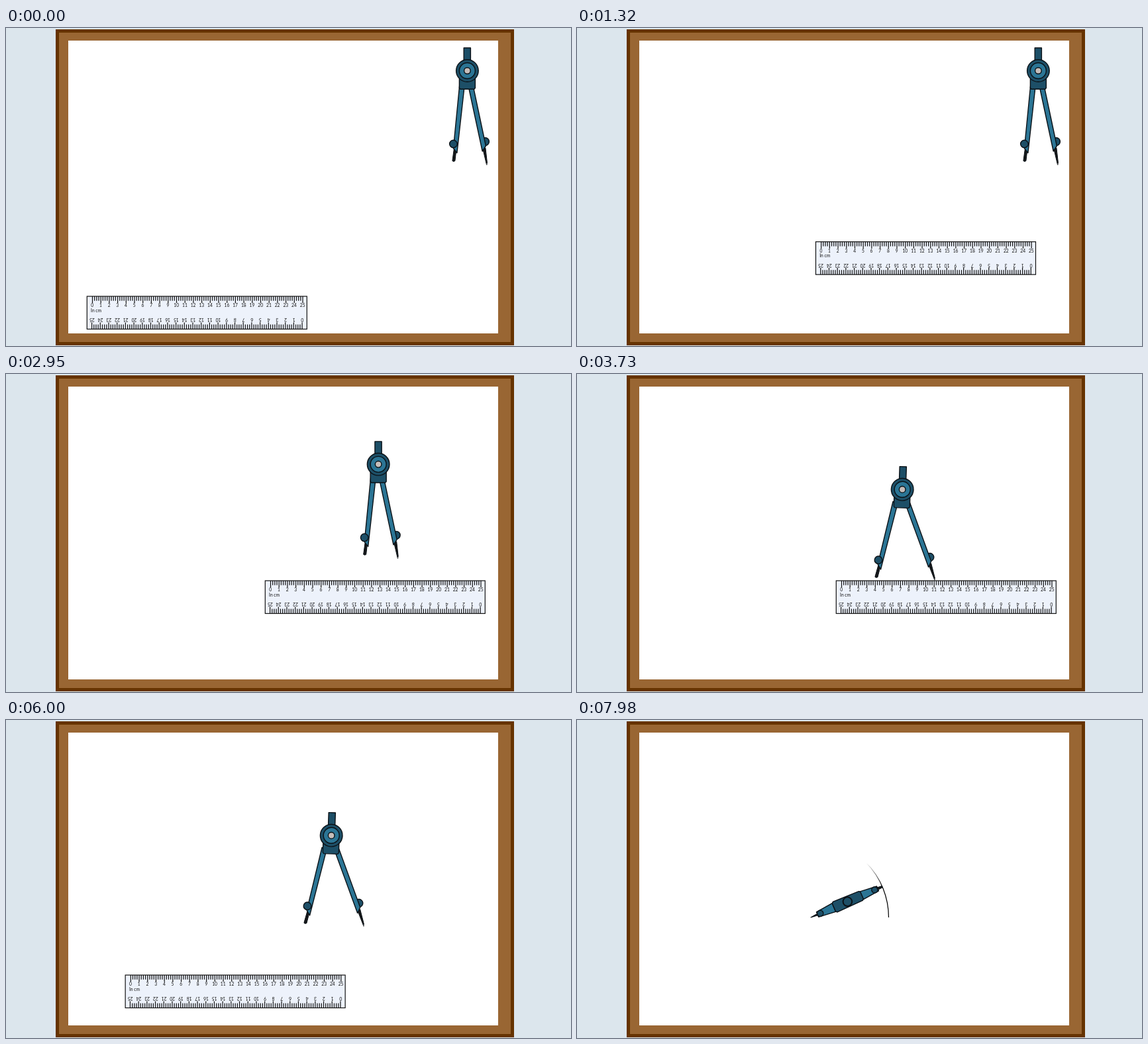
An HTML page that plays this animation: 853x480 px, repeating every 8 s.

```html
<!DOCTYPE html>
<html lang="en">
<head>
<meta charset="utf-8">
<title>Ruler and compass</title>
<style>
html, body { margin: 0; width: 100%; height: 100%; overflow: hidden; background: #dce6ed; }
svg { display: block; width: 853px; height: 480px; }
text { font: 6.7px Lato, "Open Sans", sans-serif; fill: #111; }
.num { text-anchor: middle; }
.tool { stroke: #0b1116; stroke-width: 1.4; stroke-linejoin: round; }
.dark { fill: #1d4f67; }
.blue { fill: #2b7595; }
.metal { fill: #15181a; stroke-width: 1; }
</style>
</head>
<body>
<svg viewBox="0 0 853 480">
  <defs>
    <linearGradient id="wipe" gradientUnits="userSpaceOnUse" x1="0" y1="0" x2="0" y2="35">
      <stop offset="0" stop-opacity="0"/>
      <stop offset="1"/>
    </linearGradient>
  </defs>
  <rect x="77.5" y="4.5" width="687" height="472" fill="#996633" stroke="#663300" stroke-width="5"/>
  <rect x="94" y="19" width="649" height="442" fill="#fff"/>

  <g id="ruler">
    <rect x=".5" y=".5" width="332" height="49.5" fill="#edf2fb" stroke="#111" stroke-width="1.2"/>
    <g id="scale"></g>
    <use href="#scale" transform="rotate(180 167 25.2)"/>
    <text x="6.3" y="24.3">In cm</text>
  </g>

  <!-- Side view, origin at the hinge -->
  <g id="compass" class="tool">
    <g id="left">
      <path class="metal" d="M-20 118l3.5 .5-2 17.5q-2 2-4 0z"/>
      <path class="blue" d="M-11.5 20h7.6L-15.5 124l-5.5-7z"/>
      <circle class="dark" cx="-21" cy="110.5" r="5.8"/>
    </g>
    <g id="right">
      <circle class="dark" cx="27" cy="107" r="6"/>
      <path class="metal" d="M23.5 118l4-1.5 2.5 22-.7 4z"/>
      <path class="blue" d="M1 20h7.2L28 113.5l-5.2 8z"/>
      <path d="M29.5 140v2.5" stroke="#999" stroke-width=".8"/>
    </g>
    <g id="head" class="dark">
      <rect x="-5.2" y="-34.5" width="10.2" height="22"/>
      <path d="M-12 8h24v18l-1.5 1.7h-21L-12 26z"/>
      <circle r="16.8"/>
      <circle class="blue" r="12"/>
      <circle r="4.8" fill="#c6bebb"/>
    </g>
  </g>

  <path id="arc" d="M470.5 298A117.5 117.5 0 0 0 353 180.5" fill="none" stroke="url(#wipe)" stroke-width="1.2"/>
  <!-- Top view, origin at the needle point -->
  <g id="top" class="tool">
    <path class="metal" d="M0 0l11-1.2v2.4zM108-2l9.5 .8v2.4L108 2z"/>
    <path class="blue" d="M11-4L38-7V7L11 4zM83-6.5L110-3.8V3.8L83 6.5z"/>
    <circle class="dark" cx="15.5" r="4.6"/>
    <circle class="dark" cx="105" r="4.6"/>
    <path class="dark" d="M40-8.5L82-7.5l2 2v11l-2 2L40 8.5l-2-2v-13z"/>
    <circle class="dark" cx="60.3" r="6.8" stroke-width="2"/>
  </g>
</svg>
<script>
const LOOP = 8000, STEP = 60;
const $ = id => document.getElementById(id);
const clamp = u => Math.min(1, Math.max(0, u));
const ease = u => u * u * u * (10 - 15 * u + 6 * u * u);
const move = (t, start, length) => ease(clamp((t - start) / length));
const place = (id, value) => $(id).setAttribute('transform', value);
const show = (id, on) => $(id).style.display = on ? '' : 'none';

function buildScale() {
  const unit = 12.7, x0 = 8.7;
  let ticks = '', labels = '';
  for (let i = 0; i <= 100; i++)
    ticks += `M${x0 + i * unit / 4} .5v${i % 4 ? 6.8 : 10}`;
  for (let n = 0; n <= 25; n++)
    labels += `<text class="num" x="${x0 + n * unit - .3}" y="16.5">${n}</text>`;
  $('scale').innerHTML = `<path d="${ticks}" stroke="#111" stroke-width="1.2"/>${labels}`;
}

function draw(time) {
  const t = Math.floor(time / STEP) * STEP;

  const along = move(t, 52, 1714) - move(t, 4848, 1737);
  place('ruler', `translate(${121.8 + 269 * along} ${404.5 - 93 * along})`);
  show('ruler', time < 6540);

  const drop = move(t, 1895, 1790), open = time >= 3730;
  place('compass', `translate(${696.4 - 205.2 * drop} ${64.5 + 109.8 * drop})`);
  place('left', `rotate(${open ? 8 : 0})`);
  place('right', `rotate(${open ? -8 : 0})`);
  place('head', `rotate(${open ? 2 : 0})`);
  show('compass', time < 7540);

  const turn = clamp((t - 7800) / 180);
  place('top', `translate(353 298) rotate(${-23.3 * turn})`);
  $('wipe').setAttribute('gradientTransform', `translate(0 ${298 - 82 * turn})`);
  show('top', time >= 7800);
  show('arc', time >= 7800);
}

buildScale();
const begin = performance.now();
function frame() {
  draw((performance.now() - begin) % LOOP);
  requestAnimationFrame(frame);
}
frame();
</script>
</body>
</html>
```
